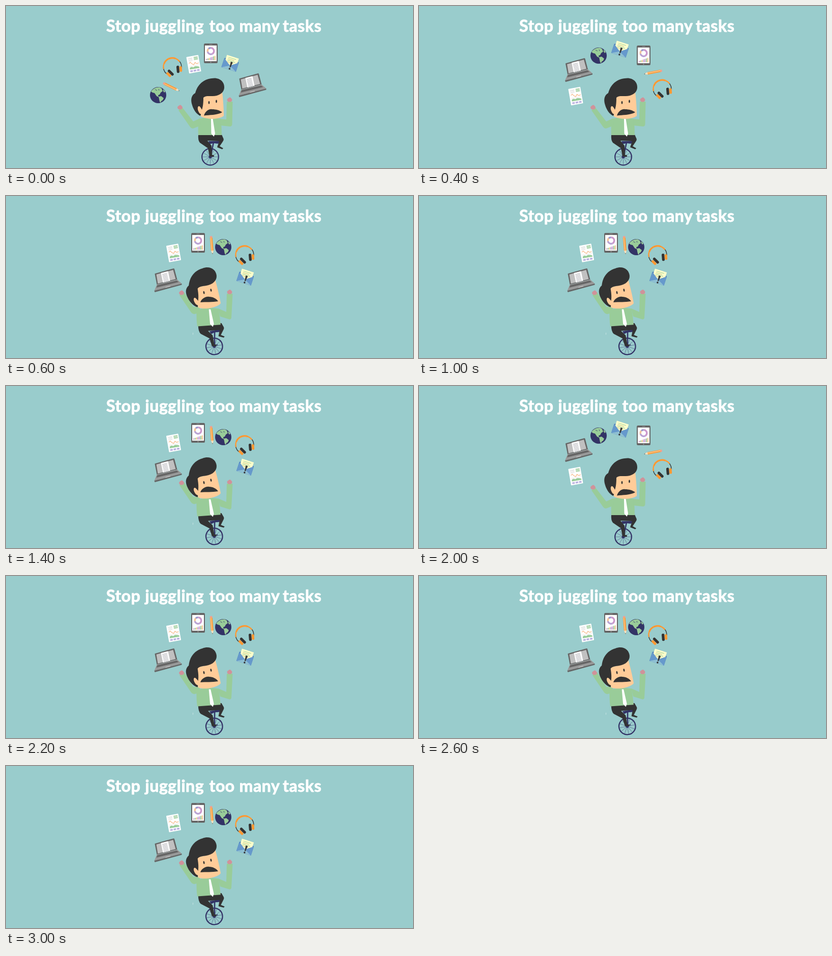
An HTML page with a canvas for the animation above (3.2 s loop, 800 by 320 pixels).

```html
<!DOCTYPE html>
<html lang="en">
<head>
<meta charset="utf-8">
<title>Juggling tasks</title>
<style>
html, body { margin: 0; width: 100%; height: 100%; overflow: hidden; background: #9cc; }
canvas { display: block; width: 800px; height: 320px; }
</style>
</head>
<body>
<canvas id="stage" width="800" height="320"></canvas>
<script>
const ctx = document.getElementById('stage').getContext('2d');
const DARK = '#333333', NAVY = '#333366', SKIN = '#ffcc99', GREEN = '#99cc99',
  ORANGE = '#ff9933', GRAY = '#666666', LILAC = '#b9a3d3', HAND = '#d0929a';

function fill(d, color) {
  ctx.fillStyle = color;
  ctx.fill(new Path2D(d));
}
function line(d, color, width) {
  ctx.strokeStyle = color;
  ctx.lineWidth = width;
  ctx.stroke(new Path2D(d));
}
function rect(x, y, w, h, color, r = 0) {
  ctx.fillStyle = color;
  ctx.beginPath();
  ctx.roundRect(x, y, w, h, r);
  ctx.fill();
}
function oval(x, y, rx, ry, color, deg = 0) {
  ctx.fillStyle = color;
  ctx.beginPath();
  ctx.ellipse(x, y, rx, ry, deg * Math.PI / 180, 0, Math.PI * 2);
  ctx.fill();
}
function arc(r, from, to, color, width) {
  ctx.strokeStyle = color;
  ctx.lineWidth = width;
  ctx.beginPath();
  ctx.arc(0, 0, r, from * Math.PI / 180, to * Math.PI / 180);
  ctx.stroke();
}
function placed(x, y, deg, draw) {
  ctx.save();
  ctx.translate(x, y);
  ctx.rotate(deg * Math.PI / 180);
  draw();
  ctx.restore();
}
// Rotates about the hips, then shifts by dx, dy
function leaned(deg, dx, dy, draw) {
  placed(400 + dx, 257 + dy, deg, () => { ctx.translate(-400, -257); draw(); });
}

function tablet() {
  rect(-13.5, -19.5, 27, 39, GRAY, 2.5);
  rect(-11.5, -15.5, 23, 31, '#ffffff');
  rect(-3, -18, 6, 1, '#999999');
  oval(0, 17.5, 1.2, 1.2, '#999999');
  placed(0, -4.5, 0, () => {
    arc(6.3, -90, 60, '#cc99cc', 3.4);
    arc(6.3, 60, 170, LILAC, 3.4);
    arc(6.3, 170, 225, '#f0c49c', 3.4);
    arc(6.3, 225, 270, '#9999cc', 3.4);
  });
  const colors = ['#cc99cc', GREEN, '#f0c080', LILAC];
  for (let i = 0; i < 7; i++) {
    const h = 2.5 + i;
    rect(-9.5 + i * 2.8, 13.5 - h, 2, h, colors[i % 4]);
  }
}

function headphones() {
  arc(17.8, 140, 200, DARK, 1.4);
  arc(17.8, -20, 40, DARK, 1.4);
  arc(17.5, 190, 350, ORANGE, 2.4);
  arc(17.3, 225, 315, ORANGE, 3.2);
  for (const side of [-1, 1]) {
    placed(side * 13, 11, side * 20, () => rect(-2.5, -5.5, 5, 11, ORANGE, 2));
    placed(side * 7.8, 9.2, side * 20, () => rect(-2.6, -7.2, 5.2, 14.4, DARK, 2.2));
  }
}

function report() {
  rect(-12, -16.5, 24, 33, '#ffffff', 1);
  for (let i = 0; i < 3; i++) {
    rect(-9, -13 + i * 2.5, 8, 0.8, '#cccccc');
    rect(2, -14 + i * 2.2, 8, 1.5, GREEN);
  }
  line('M-9 -3 L-6 -5 L-3 -1 L0 1 L3 -3 L6 0 L10 -1', '#f5ae78', 1);
  line('M-9 3 H10', '#dddddd', 0.7);
  fill('M-9 9 V6 Q-5 3 -2 6 Q2 3 5 5 Q8 5 10 7 V9Z', GREEN);
  for (let i = 0; i < 3; i++) rect(-9 + i * 6.7, 11, 5, 3.5, '#bbb3e0');
}

function mail() {
  fill('M-15 -8 L0 -14 L15 -8 V11 H-15Z', '#4d7fb5');
  rect(-12, -15.5, 24.5, 20, '#ffffcc');
  for (let i = 0; i < 4; i++) rect(-8, -12.5 + i * 3, i % 2 ? 13 : 16, 1, i % 2 ? '#c6c68c' : GREEN);
  fill('M-15 11 L0 1 L15 11Z', '#8fc0d2');
  fill('M-15 -8 L0 3 L-15 11Z M15 -8 L0 3 L15 11Z', '#6699cc');
  fill('M-.7 -5 H3.3 L2.2 6 H.4Z', DARK);
  oval(1.2, 9, 1.7, 1.7, DARK);
}

function laptop() {
  fill('M-26 -13 Q-26 -14 -25 -14 L11 -24 Q12 -24 12.5 -23 L18 -2 L-22 8Z', GRAY);
  fill('M-23 -12 L10 -21 L15 -3 L-20 6Z', '#c0c0c0');
  fill('M-14 -15 L0 -18.5 L4 .5 L-10 4Z', '#ffffff');
  for (let i = 0; i < 7; i++) {
    const x = -11.5 + i * 0.55, y = -12 + i * 2.3;
    line(`M${x} ${y} l9.5 -2.4`, '#9c9ca4', 0.8);
  }
  fill('M-22 8 L18 -2 L27 6 L-27 20Z', '#999999');
  fill('M-21 9 L17 0 L21 3 L-23 14Z', GRAY);
  fill('M-5 13 L4 10.5 L5 12.5 L-5 15Z', '#cccccc');
  fill('M-27 20 L27 6 L27 8.5 L-26 23Z', GRAY);
}

function globe() {
  oval(0, 0, 16, 16, NAVY);
  fill('M-14 -7 C-10 -13 -4 -16 3 -15.5 L7 -13 L9 -8 L5 -5 L3 -1 L0 0 L1 4 L-3 2 L-7 -4 L-11 -5Z', GREEN);
  fill('M1 3 L6 2 L11 6 L9 10 L6 12 L5 15 L3 13 L2 8Z', GREEN);
  fill('M10 -12 L14 -7 L12 -5 L10 -8Z', GREEN);
  line('M-6 -11 L-2 -9 M1 -12 L2 -9', NAVY, 0.8);
}

function pencil() {
  rect(-18, -2.4, 4, 4.8, '#f0a090', 1.5);
  rect(-14.5, -2.4, 25.5, 4.8, ORANGE);
  rect(-14.5, -0.4, 25.5, 1.7, '#ffc48a');
  fill('M11 -2.4 L18 0 L11 2.4Z', '#ffe0bd');
  fill('M16 -.7 L18 0 L16 .7Z', DARK);
}

function unicycle() {
  const x = 401.5, y = 298;
  for (let i = 0; i < 6; i++) {
    const a = i * Math.PI / 6, c = 15 * Math.cos(a), s = 15 * Math.sin(a);
    line(`M${x - c} ${y - s} L${x + c} ${y + s}`, '#52648c', 0.7);
  }
  placed(x, y, 0, () => arc(16.3, 0, 360, NAVY, 2.3));
  line('M408 269 L402 298', NAVY, 2.6);
  fill('M398 267 H420 Q421 271 416 272 L408 271 L400 273Z', NAVY);
  oval(x, y, 3, 3, NAVY);
  line('M402 298 L409 296', NAVY, 1.6);
}

function trousers() {
  fill('M378 254 L424 254 L427 261 Q429 264 426 268 L420 277 L427 281 L425 283 L415 279 L419 267 L396 266 ' +
    'L404 276 L405 294 L409 295 L408 298 L400 297 L397 281 L381 270 Q377 265 378 254Z', DARK);
}

function torso() {
  fill('M379 223 Q400 217 422 223 Q424 238 424 255 L378 255 Q377 240 379 223Z', GREEN);
  fill('M403 223 L406.5 223 L411 252 L408.5 258 L403.5 252Z', '#ffffff');
}

function head() {
  fill('M372 172 C363 177 363 187 366 196 C369 206 375 214 382 217 L392 190 L388 172Z', DARK);
  fill('M386 176 C398 180 414 178 425 169 C427 188 428 205 428 217 C420 224 394 225 383 218 C383 204 384 190 386 176Z', SKIN);
  oval(381, 205.5, 3.6, 8, SKIN, -18);
  fill('M371 177 C374 158 386 145 404 143 C420 140 430 150 429 162 C428 172 418 178 406 178 ' +
    'C398 178 392 177 388 181 C388 192 387 199 385 205 C381 196 376 192 373 193Z', DARK);
  oval(399, 190.7, 1.4, 3, DARK);
  oval(413.5, 188.3, 1.4, 3, DARK);
}

function hand(x, y) {
  oval(x, y, 5, 4, HAND);
  oval(x + 0.5, y - 3, 2.4, 1.9, HAND);
}

function man(lean) {
  leaned(lean ? -11 : 0, 0, 0, unicycle);
  leaned(lean ? -7 : 0, 0, 0, trousers);
  leaned(lean ? -4 : 0, lean ? -2 : 0, lean ? 1 : 0, torso);

  if (lean) {
    fill('M341 196 L350 190 L368 219 L381 218 L381 231 L371 233 Q367 234 364 230Z', GREEN);
    fill('M434 193 H445.5 L443 241 Q442 245 437 243 L421 238 L417 222 L433 229Z', GREEN);
    hand(345, 191.5);
    hand(439.5, 190);
  } else {
    fill('M339 206 L347 201 L368 228 L381 222 L383 236 L369 241.5 Q365 243 362 239Z', GREEN);
    fill('M434 189 H445.5 L444.5 234 Q444 238 440 238 L422 236 L421 223 L433 224Z', GREEN);
    hand(342, 200.5);
    hand(439.5, 185.5);
  }

  leaned(lean ? -9.5 : 0, lean ? 1 : 0, lean ? -1 : 0, head);
  if (lean) {
    fill('M382 210 C385 202 393 198 399 199 C407 199 414 203 417 208 C406 210 392 209 382 210Z', DARK);
    rect(367, 270, 1, 4, '#c4e2e2');
  } else {
    fill('M389 216.5 C392 208 398 203 405 204 C413 204 420 206 425 210 C414 216 400 215 389 216.5Z', DARK);
  }
}

// Each pose: [drawing, x, y, degrees]
const poses = {
  right: [[globe, 299, 176, 0], [pencil, 325, 160, 26], [headphones, 327, 120, -25],
    [report, 369, 115, -10], [tablet, 402.5, 93.5, 0], [mail, 441, 115, 18], [laptop, 484.5, 157, 0]],
  mid: [[laptop, 318.5, 167, 0], [report, 329.5, 112.5, -10], [tablet, 377.5, 92.5, 0],
    [pencil, 404.5, 97, 85], [globe, 427, 101, 0], [headphones, 469, 116, -25], [mail, 470.5, 162, 18]],
  left: [[report, 308, 178, -10], [laptop, 314, 127, 0], [globe, 353, 98, 0],
    [mail, 395.5, 87, 18], [tablet, 441.5, 97.5, 0], [pencil, 460, 131, 169], [headphones, 478, 163.5, -25]]
};
const order = ['right', 'mid', 'left', 'mid'];
const words = [['Stop', 197], ['juggling', 273.5], ['too', 399.5], ['many', 458.5], ['tasks', 544]];

function title() {
  ctx.font = '700 32px Lato, "Open Sans", sans-serif';
  ctx.letterSpacing = '0.6px';
  ctx.fillStyle = ctx.strokeStyle = '#ffffff';
  ctx.lineWidth = 0.9;
  ctx.lineJoin = 'round';
  for (const [word, x] of words) {
    ctx.fillText(word, x, 50.5);
    ctx.strokeText(word, x, 50.5);
  }
}

const start = performance.now();
function frame() {
  const step = Math.floor(Math.max(0, performance.now() - start) / 200) % order.length;
  const pose = order[step];
  rect(0, 0, 800, 320, '#99cccc');
  title();
  man(pose === 'mid');
  for (const [draw, x, y, deg] of poses[pose]) placed(x, y, deg, draw);
  requestAnimationFrame(frame);
}
frame();
</script>
</body>
</html>
```
